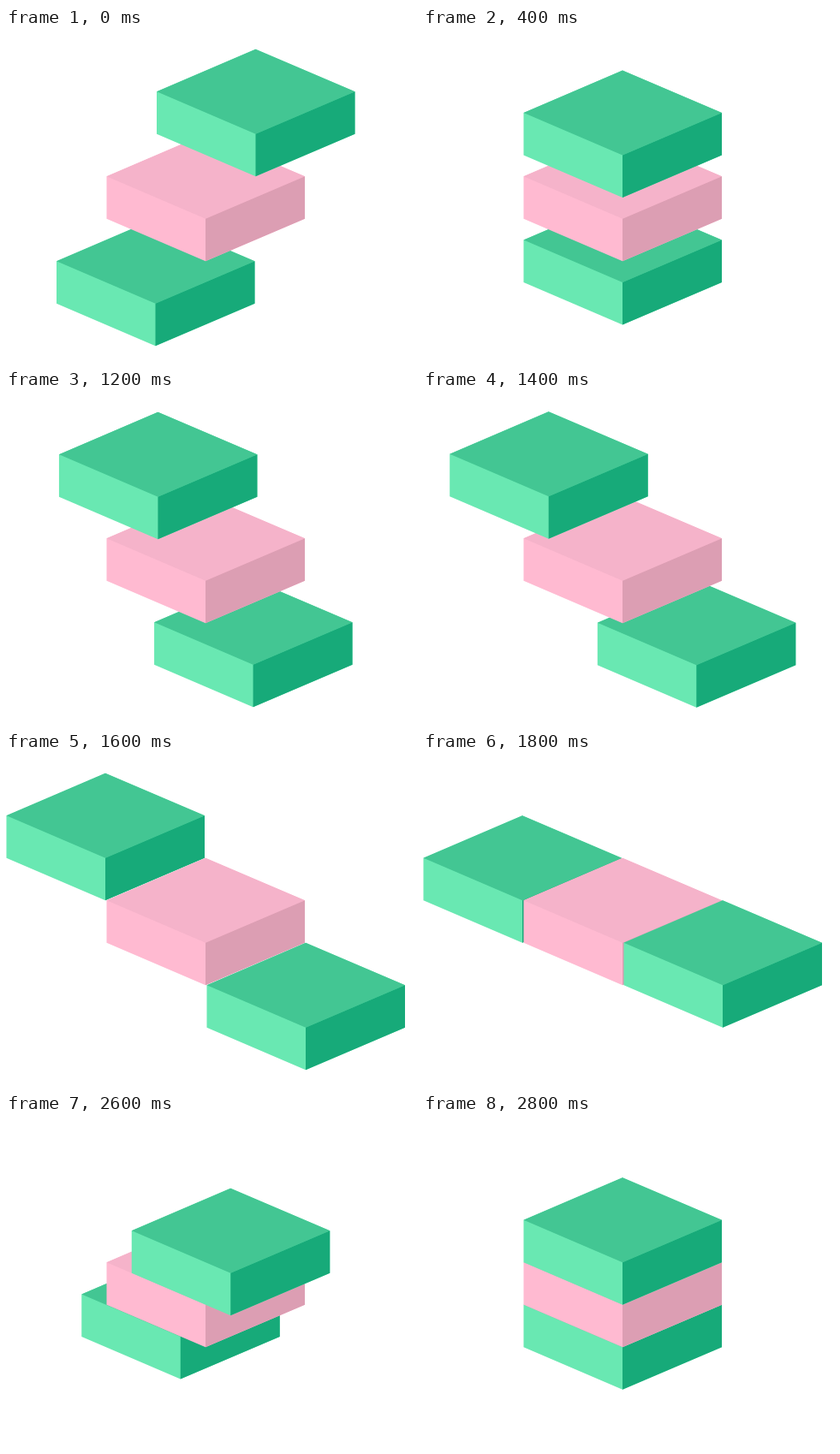
Animation of 480 by 390 pixels, one loop 3 s. Source, as an HTML page:

```html
<!DOCTYPE html>
<html lang="en">
<head>
<meta charset="utf-8">
<title>Sliding blocks</title>
<style>
  html, body { margin: 0; width: 100%; height: 100%; overflow: hidden; background: #fff; }
  svg { display: block; width: 100vw; height: 100vh; }
  .green { --top: #43c693; --left: #69e8b2; --right: #17aa79; }
  .pink { --top: #f5b3ca; --left: #ffbad1; --right: #dc9eb3; }
  .body { fill: var(--left); }
  .lid { fill: var(--top); }
  .side { fill: var(--right); }
</style>
</head>
<body>
<svg viewBox="0 0 480 390">
  <defs>
    <!-- origin is the rear corner of the lid -->
    <g id="block">
      <path class="body" d="M0 0L116 49.5V99L0 148.5L-115.5 99V49.5Z"/>
      <path class="lid" d="M0 0L116 49.5L0 99L-115.5 49.5Z"/>
      <path class="side" d="M0 99L116 49.5V99L0 148.5Z"/>
    </g>
  </defs>
  <g transform="translate(233 123.8)">
    <use id="back" class="green" href="#block"/>
    <use class="pink" href="#block"/>
    <use id="front" class="green" href="#block"/>
  </g>
</svg>
<script>
  const STEP = 200, LOOP = 3000;
  const UNIT_X = 117, UNIT_Y = 49.5; // half a block's width, one block's height

  // Path of the front block around the pink one; the back block mirrors it.
  const path = [
    { at: 0, x: 0.5, y: -2 },
    { at: 400, x: 0, y: -1.5 },
    { at: 800, x: 0, y: -1.5 },
    { at: 1200, x: -0.475, y: -1.98 },
    { at: 1600, x: -1, y: -2 },
    // the green blocks trade depth: the right one rises in front
    { at: 1600, x: 1, y: 2 },
    { at: 2000, x: 1, y: 0 },
    { at: 2800, x: 0, y: -1 },
    { at: LOOP, x: 0, y: -1 }
  ];

  function positionAt(time) {
    const next = path.findIndex(key => key.at > time);
    const from = path[next - 1], to = path[next];
    const progress = (time - from.at) / (to.at - from.at);
    const mix = axis => from[axis] + (to[axis] - from[axis]) * progress;
    return [mix("x") * UNIT_X, mix("y") * UNIT_Y];
  }

  const back = document.getElementById("back");
  const front = document.getElementById("front");
  const place = (block, x, y) => block.setAttribute("transform", `translate(${x} ${y})`);
  const start = performance.now();

  function draw() {
    const elapsed = (performance.now() - start) % LOOP;
    const [x, y] = positionAt(Math.floor(elapsed / STEP) * STEP);
    place(front, x, y);
    place(back, -x, -y);
    requestAnimationFrame(draw);
  }
  draw();
</script>
</body>
</html>
```
